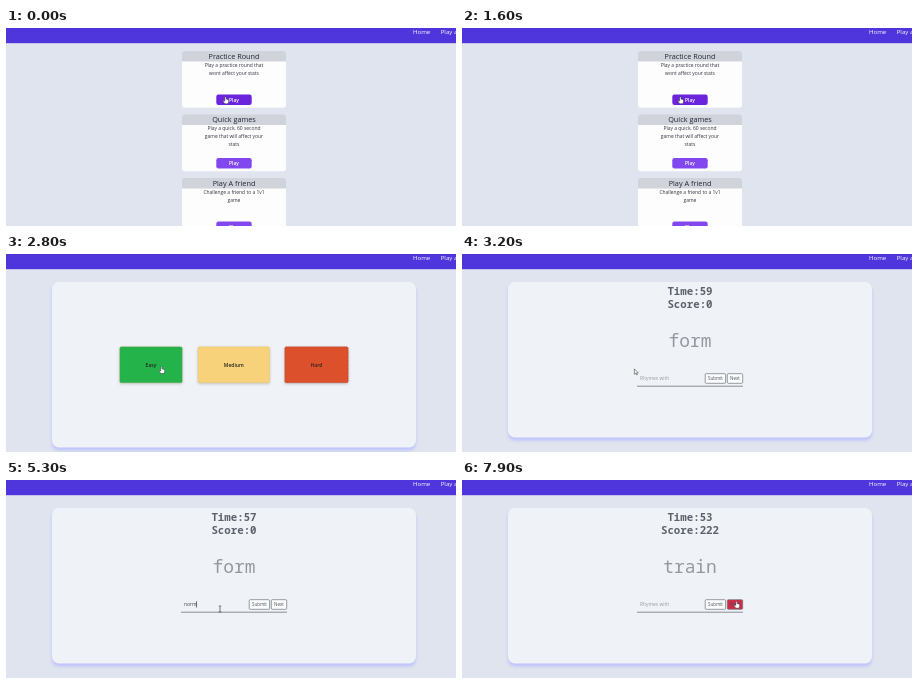
Write an HTML page that moves like this. It is 450x198 px and loops after 8000 ms.

```html
<!DOCTYPE html>
<html lang="en">
<head>
<meta charset="utf-8">
<title>Rhyme game</title>
<style>
  html, body { margin: 0; width: 100%; height: 100%; overflow: hidden; background: #dfe4ee; }
  svg { display: block; width: 450px; height: 198px; font-family: "Open Sans", sans-serif; }
  .mid { text-anchor: middle; }
  .mono { font-family: "Noto Sans Mono", monospace; }
  .nav { font-size: 6.1px; fill: #fff; }
  .title { font-size: 7.3px; fill: #1f2430; }
  .body { font-size: 4.95px; fill: #30343c; }
  .play { font-size: 4.9px; font-weight: 600; fill: #fff; }
  .level { font-size: 5px; font-weight: 600; fill: #28251f; }
  .stat { font-size: 10.75px; font-weight: 700; fill: #5c616b; }
  .word { font-size: 17.9px; fill: #93979f; }
  .gain { font-size: 9.5px; fill: #4ccb78; }
  .found { font-size: 5.95px; font-weight: 700; fill: #35cf62; }
  .input { font-size: 4.9px; }
  .btn { font-size: 4.5px; fill: #4b5058; }
  .panel { fill: #eff3f8; filter: drop-shadow(0 3px 1.5px #bfc3fb); }
  .tile { filter: drop-shadow(0 1.5px 1.5px #0003); }
</style>
</head>
<body>
<svg viewBox="0 0 450 198">
  <rect width="450" height="198" fill="#dfe4ee"/>
  <rect width="450" height="15.2" fill="#4f36dc"/>
  <text class="nav" x="407" y="6">Home</text>
  <text class="nav" x="434.7" y="6">Play a game</text>

  <g id="menu"></g>

  <g id="levels">
    <rect class="panel" x="46" y="28" width="364" height="165.5" rx="7"/>
  </g>

  <g id="game">
    <rect class="panel" x="46" y="28" width="364" height="155.5" rx="7"/>
    <text id="time" class="stat mono mid" x="228" y="41"></text>
    <text id="score" class="stat mono mid" x="228" y="53.8"></text>
    <text id="gain" class="gain mid" x="228" y="66"></text>
    <text id="word" class="word mono mid" x="228" y="93.3"></text>
    <path d="M175 132.2H281" stroke="#7d828a" stroke-width=".9"/>
    <text id="input" class="input" x="178" y="126.3"></text>
    <path id="caret" d="M178 121.3V127.5" stroke="#333" stroke-width=".7"/>
    <g stroke="#6f747c" stroke-width=".7">
      <rect x="243.2" y="119.7" width="20.4" height="9.6" rx="1" fill="#fbfcfd"/>
      <rect id="next" x="265.3" y="119.7" width="15.4" height="9.6" rx="1"/>
    </g>
    <text class="btn mid" x="253.4" y="126.2">Submit</text>
    <text class="btn mid" x="273" y="126.2">Next</text>
    <text id="found" class="found mono" x="183.3" y="155.2" xml:space="preserve"></text>
  </g>

  <g id="pointer" stroke-linejoin="round">
    <path id="arrow" d="M0 0V5.4L1.3 4.3L2.1 6.1L3 5.7L2.2 4H3.8Z" fill="#fff" stroke="#333" stroke-width=".55"/>
    <path id="hand" d="M-.7 .4Q0-.5 .7 .4V2.3L3.2 3V5.3L2.4 7H-.7L-2.6 4.2Q-2.2 3.3-.7 4.3Z" fill="#fff" stroke="#2a2a35" stroke-width=".5"/>
    <path id="beam" d="M-1.3-3H-.3L0-2.7L.3-3H1.3M0-2.7V2.7M-1.3 3H-.3L0 2.7L.3 3H1.3" fill="none" stroke="#333" stroke-width=".65"/>
  </g>
</svg>
<script>
const $ = id => document.getElementById(id);
const LOOP = 8000;

// Last entry whose start time has passed; entries are [start, value].
const at = (steps, t) => steps.reduce((v, s) => t >= s[0] ? s[1] : v, steps[0][1]);
const show = (id, on) => $(id).setAttribute("visibility", on ? "inherit" : "hidden");
const fill = (id, color) => $(id).setAttribute("fill", color);
const text = (id, value) => { if ($(id).textContent !== value) $(id).textContent = value; };

const cards = [
  ["Practice Round", "Play a practice round that", "wont affect your stats"],
  ["Quick games", "Play a quick, 60 second", "game that will affect your", "stats"],
  ["Play A friend", "Challenge a friend to a 1v1", "game"]
];
$("menu").innerHTML = cards.map(([title, ...lines], i) => `
  <g transform="translate(176 ${22.8 + i * 63.5})">
    <rect width="104" height="57" rx="3" fill="#fdfdfe"/>
    <path d="M0 10.6V3Q0 0 3 0H101Q104 0 104 3V10.6Z" fill="#d0d4da"/>
    <text class="title mid" x="52" y="8.1">${title}</text>
    ${lines.map((s, n) => `<text class="body mid" x="52" y="${16 + n * 7.9}">${s}</text>`).join("")}
    <rect x="34.3" y="43.8" width="35.4" height="10.4" rx="2.2" fill="${i ? "#8048ee" : "#6a25dc"}"/>
    <text class="play mid" x="52" y="50.8">Play</text>
  </g>`).join("");

const tiles = [
  ["Easy", 113.8, 62.4, "#6fac50", "#3f7f35"],
  ["Medium", 192, 71.6, "#f7d27b", "#e6b95a"],
  ["Hard", 278.8, 63.4, "#dc512b", "#9c3420"]
];
$("levels").innerHTML += tiles.map(([name, x, w, color, edge]) => `
  <rect id="${name}" class="tile" x="${x}" y="92.8" width="${w}" height="36" rx="1.5"
    fill="${color}" stroke="${edge}" stroke-width=".6" stroke-dasharray="1 1"/>
  <text class="level mid" x="${x + w / 2}" y="112.7">${name}</text>`).join("");

const page = [[0, "menu"], [1900, "levels"], [3000, "game"]];
const typed = [
  [0, ""], [4900, "n"], [5000, "no"], [5100, "nor"], [5300, "norm"], [5500, ""],
  [5700, "d"], [5800, "do"], [5900, "dor"], [6100, "dorm"], [6300, ""]
];
const score = [[0, 0], [5500, 165], [6300, 222]];
const gain = [[0, ""], [5500, "+ 165"], [6300, "+ 57"], [7000, ""]];
const found = [[0, ""], [5500, "norm"], [6300, "norm dorm"], [7300, ""]];
const word = [[0, "form"], [7300, "train"]];
const caret = [
  [0, 0], [3900, 1], [4400, 0], [4800, 1], [6700, 0], [7100, 1], [7200, 0], [7300, 1], [7700, 0]
];
const shape = [[0, "hand"], [1900, "arrow"], [2700, "hand"], [3000, "arrow"], [3700, "beam"], [6800, "arrow"], [7000, "hand"]];

// Pointer stops: time, x, y
const path = [
  [0, 219.5, 68.8], [1500, 218.8, 68.8], [1900, 216, 68.5], [2350, 216, 68.5],
  [2750, 155.5, 112.6], [3000, 155.5, 112.6], [3500, 203, 119], [3600, 203, 119],
  [3700, 214, 129], [6600, 214, 129], [7050, 274, 121.5], [7700, 274, 121.5],
  [7800, 274.5, 121.2], [LOOP, 274.5, 121.2]
];
function pointer(t) {
  const i = path.findIndex(p => p[0] > t);
  const [t0, x0, y0] = path[i - 1], [t1, x1, y1] = path[i];
  const u = (t - t0) / (t1 - t0), e = u * u * (3 - 2 * u);
  return `translate(${x0 + (x1 - x0) * e} ${y0 + (y1 - y0) * e})`;
}

function draw(t) {
  const now = at(page, t), cursor = at(shape, t), value = at(typed, t);
  for (const id of ["menu", "levels", "game"]) show(id, id === now);
  for (const id of ["arrow", "hand", "beam"]) show(id, id === cursor);
  $("pointer").setAttribute("transform", pointer(t));

  const hover = t >= 2700;
  fill("Easy", hover ? "#24b24b" : tiles[0][3]);
  $("Easy").setAttribute("stroke", hover ? "#8a9a35" : tiles[0][4]);

  text("time", "Time:" + (60 - Math.max(0, Math.floor((t - 2300) / 800))));
  text("score", "Score:" + at(score, t));
  text("gain", at(gain, t));
  text("word", at(word, t));
  text("found", at(found, t));
  text("input", value || "Rhymes with");
  fill("input", value ? "#3a3f47" : "#969ba4");
  show("caret", now === "game" && at(caret, t));
  $("caret").setAttribute("transform", `translate(${value ? $("input").getComputedTextLength() : 0})`);
  fill("next", t >= 7000 ? "#cf2b47" : "#fbfcfd");
}

function tick() {
  draw(performance.now() % LOOP);
  requestAnimationFrame(tick);
}
tick();
</script>
</body>
</html>
```
